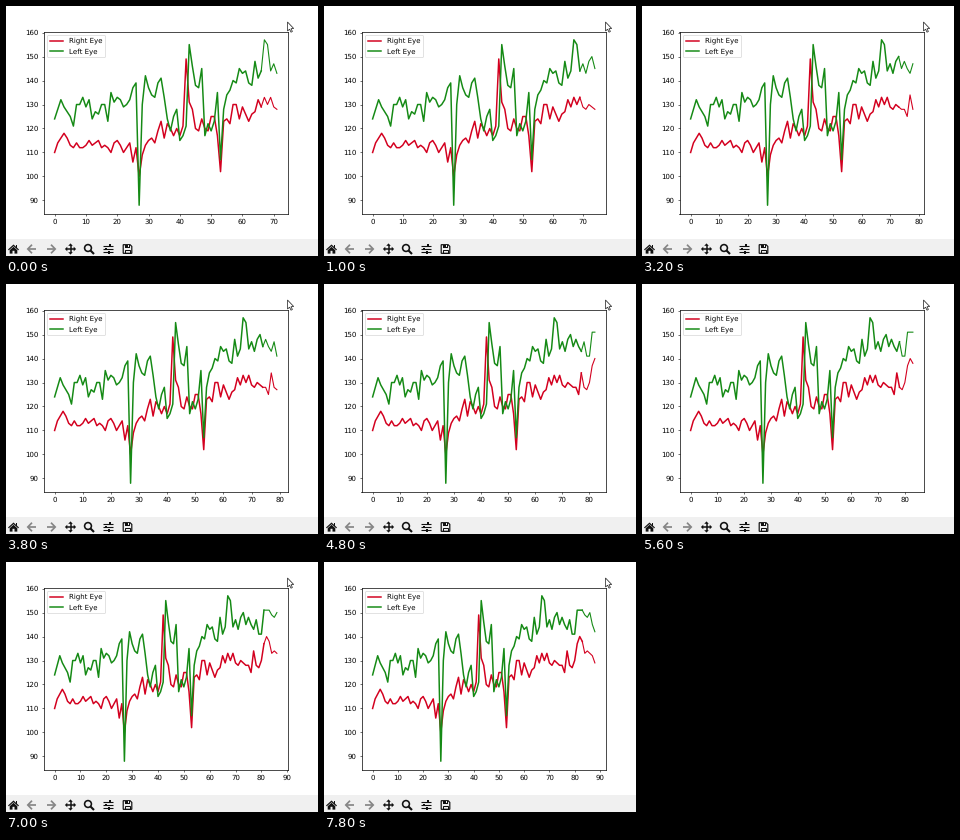
These frames come from a looping animation (312 by 250 pixels, 8 s). A matplotlib script:

```python
import matplotlib.pyplot as plt
from matplotlib.animation import FuncAnimation
from matplotlib.patches import Circle, Polygon, Rectangle
from matplotlib.ticker import MultipleLocator

W, H, DPI = 312, 250, 50
FRAMES, STEP = 40, 200
RED, GREEN = "#d3001f", "#158a15"
INK, DIM = "#111111", "#858585"
FRESH = 5  # newest segments are still drawn thin

right_eye = [
    110, 114, 116, 118, 116, 113, 112, 114, 112, 112, 113, 115, 113, 114, 115,
    112, 113, 112, 110, 114, 115, 113, 110, 112, 114, 106, 112, 100, 109, 113,
    115, 116, 114, 119, 123, 116, 122, 120, 117, 120, 117, 121, 149, 131, 128,
    120, 119, 124, 120, 119, 125, 125, 117, 102, 123, 124, 122, 130, 130, 124,
    129, 126, 123, 126, 127, 132, 129, 133, 130, 133, 129, 128, 130, 129, 128,
    128, 125, 134, 128, 127, 130, 137, 140, 138, 133, 134, 133, 132, 129,
]
left_eye = [
    124, 128, 132, 129, 127, 125, 121, 130, 130, 133, 129, 132, 124, 127, 126,
    130, 130, 123, 135, 131, 133, 132, 129, 130, 132, 137, 139, 88, 130, 142,
    137, 134, 133, 139, 141, 133, 124, 119, 125, 128, 115, 117, 121, 155, 146,
    138, 137, 145, 117, 122, 119, 123, 135, 107, 128, 134, 136, 140, 139, 145,
    143, 144, 139, 138, 148, 141, 144, 157, 155, 144, 147, 143, 148, 150, 145,
    148, 145, 143, 147, 141, 141, 151, 151, 151, 149, 148, 150, 145, 142,
]

plt.rcParams.update({
    "toolbar": "None",
    "font.family": "DejaVu Sans",
    "font.size": 9.86,
    "text.hinting": "none",
    "text.hinting_factor": 1,
})
fig = plt.figure(figsize=(W / DPI, H / DPI), dpi=DPI, facecolor="white")

# Window layer in pixel coordinates, y pointing down
win = fig.add_axes([0, 0, 1, 1], zorder=-1)
win.set(xlim=(0, W), ylim=(H, 0))
win.axis("off")


def px(n):
    return n * 72 / DPI


def poly(points, color=INK, **kw):
    win.add_patch(Polygon(points, fc=color, **{"lw": 0, **kw}))


def box(x, y, w, h, color=INK, **kw):
    win.add_patch(Rectangle((x, y), w, h, fc=color, **{"lw": 0, **kw}))


def stroke(xs, ys, width, color=INK):
    win.plot(xs, ys, color=color, lw=px(width), solid_capstyle="butt",
             solid_joinstyle="miter")


def home(x, y):
    poly([(x - 5.5, y + 0.5), (x, y - 4.5), (x + 5.5, y + 0.5),
          (x + 4.7, y + 1.3), (x, y - 2.8), (x - 4.7, y + 1.3)])
    box(x + 2.3, y - 4, 1.4, 3)
    poly([(x - 3.8, y + 1.2), (x, y - 2.2), (x + 3.8, y + 1.2),
          (x + 3.8, y + 4.6), (x + 1, y + 4.6), (x + 1, y + 1.8),
          (x - 1, y + 1.8), (x - 1, y + 4.6), (x - 3.8, y + 4.6)])


def arrow(x, y, side):
    stroke([x - 4.4 * side, x + 4 * side], [y, y], 1.7, DIM)
    stroke([x, x + 4.2 * side, x], [y - 4.3, y, y + 4.3], 1.7, DIM)


def move(x, y):
    stroke([x - 4, x + 4], [y, y], 1.5)
    stroke([x, x], [y - 4, y + 4], 1.5)
    for dx, dy in ((1, 0), (-1, 0), (0, 1), (0, -1)):
        tip = (x + 5.6 * dx, y + 5.6 * dy)
        bx, by = x + 3.2 * dx, y + 3.2 * dy
        poly([tip, (bx + 2.3 * dy, by + 2.3 * dx),
              (bx - 2.3 * dy, by - 2.3 * dx)])


def zoom(x, y):
    win.add_patch(Circle((x - 1, y - 1), 3.4, fc="none", ec=INK, lw=px(1.6)))
    stroke([x + 1.5, x + 5], [y + 1.5, y + 5], 2.1)


def sliders(x, y):
    for dy, knob in ((-3.4, 1.6), (0, -2), (3.4, 0.6)):
        stroke([x - 5, x + 5], [y + dy, y + dy], 1.1)
        box(x + knob - 1.1, y + dy - 1.4, 2.2, 2.8)


def disk(x, y):
    poly([(x - 4.3, y - 4.3), (x + 2.6, y - 4.3), (x + 4.3, y - 2.6),
          (x + 4.3, y + 4.3), (x - 4.3, y + 4.3)],
         "#f0f0f0", ec=INK, lw=px(1.2))
    box(x - 2.5, y - 4.3, 4.6, 3.2)
    box(x + 0.4, y - 3.8, 1.1, 2)
    box(x + 0.4, y - 3.8, 1.1, 2, "#f0f0f0")
    box(x - 2.6, y + 0.8, 5.2, 3.5, "none", ec=INK, lw=px(1))


box(0, 233, W, H - 233, "#f0f0f0")
home(7.5, 243)
arrow(26, 243, -1)
arrow(45, 243, 1)
move(64.5, 243)
zoom(83, 243)
sliders(102, 243)
disk(121.5, 243)

# Mouse pointer
poly([(281.5, 16), (281.5, 25), (283.6, 23.2), (285, 26.2), (286.4, 25.5),
      (285, 22.7), (287.7, 22.5)], "white", ec="#333333", lw=px(0.8))

ax = fig.add_axes([37.5 / W, 1 - 207.5 / H, 244.5 / W, 182 / H])
ax.set_ylim(84.55, 160.45)
ax.xaxis.set_major_locator(MultipleLocator(10))
ax.yaxis.set_major_locator(MultipleLocator(10))
for spine in ax.spines.values():
    spine.set_linewidth(1)

series = []
for data, color, label in ((right_eye, RED, "Right Eye"),
                           (left_eye, GREEN, "Left Eye")):
    bold, = ax.plot([], [], color=color, lw=px(1.5), label=label)
    thin, = ax.plot([], [], color=color, lw=px(1.1))
    series.append((data, bold, thin))
ax.legend(loc="upper left")


def draw(frame):
    last = min(71 + int(frame * STEP / 470 + 0.9), len(left_eye) - 1)
    old = last - FRESH
    for data, bold, thin in series:
        bold.set_data(range(old + 1), data[:old + 1])
        thin.set_data(range(old, last + 1), data[old:last + 1])
    ax.set_xlim(-0.05 * last, 1.05 * last)
    return [line for _, *pair in series for line in pair]


anim = FuncAnimation(fig, draw, frames=FRAMES, interval=STEP,
                     init_func=lambda: draw(0), repeat=True, repeat_delay=0)
plt.show()
```
